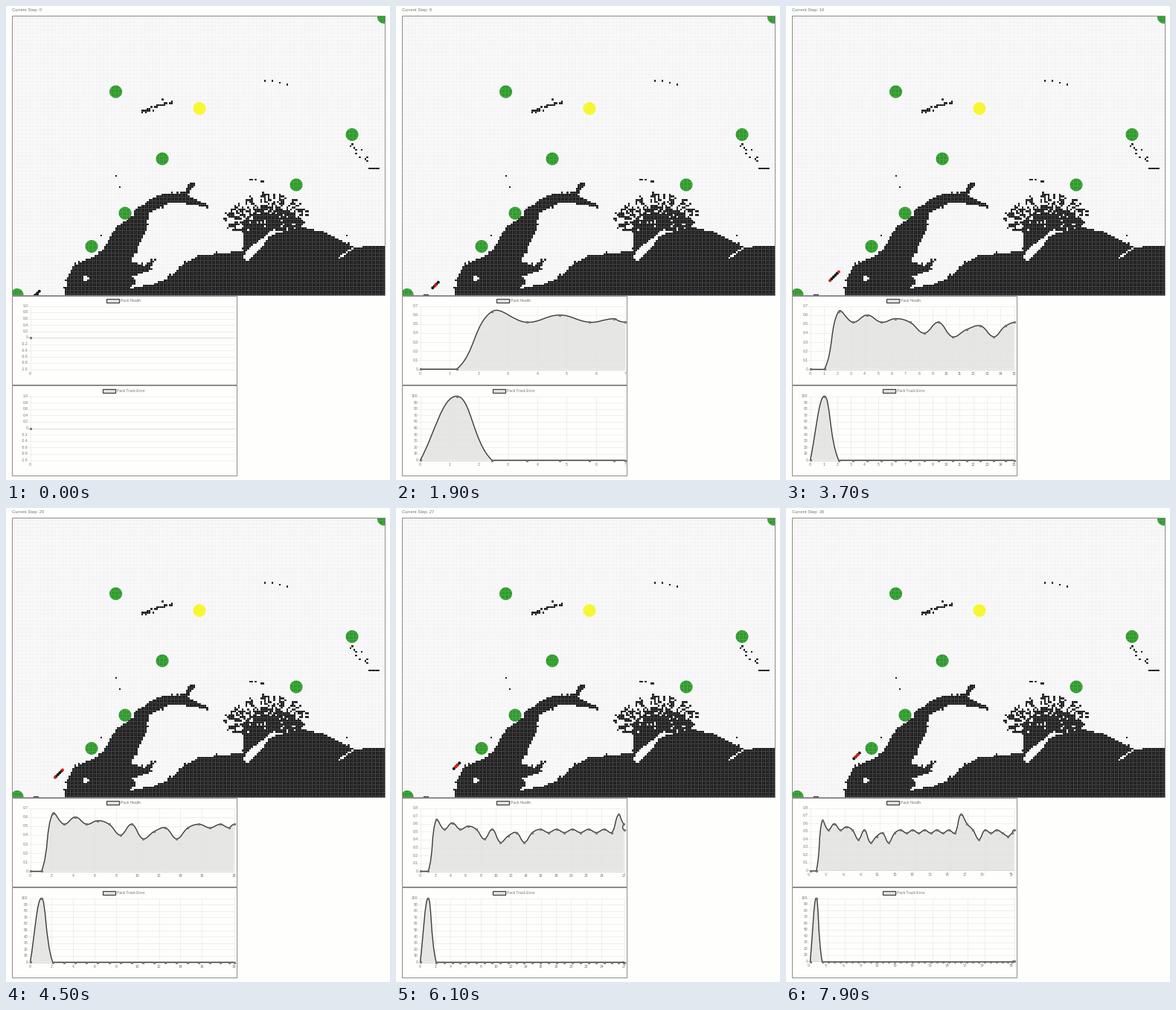
Recreate the animation shown at these times as a matplotlib script. Size 516 by 636 pixels, loop 8000 ms.

```python
import numpy as np
import matplotlib.pyplot as plt
from matplotlib.animation import FuncAnimation
from matplotlib.patches import Circle, PathPatch, Rectangle
from matplotlib.path import Path

W, H, FRAMES, DT = 516, 636, 80, 100
PT = 0.72  # points per pixel at 100 dpi
PAGE, GRID, ZERO, INK, TEXT, FILL = (
    "#fefefc", "#ececec", "#cfcfcf", "#3c3c3c", "#777777", "#e2e2e2")

plt.rcParams["font.family"] = "Liberation Sans"
fig = plt.figure(figsize=(W / 100, H / 100), dpi=100, facecolor=PAGE)
ax = fig.add_axes([0, 0, 1, 1])
ax.axis("off")
ax.set_autoscale_on(False)

# ---------------------------------------------------------------- map
X0, Y0, CELL, COLS, ROWS = 9, 14, 2.5, 200, 150

COAST = [
    (78, 390), (83, 362), (92, 347), (126, 332), (136, 318), (148, 296), (171, 281),
    (173, 273), (205, 253), (240, 250), (247, 237), (257, 235), (243, 254), (276, 270),
    (240, 265), (220, 263), (192, 277), (188, 300), (167, 342), (186, 348), (201, 339),
    (191, 356), (169, 362), (173, 370), (166, 379), (212, 370), (230, 354), (240, 345),
    (258, 335), (312, 329), (322, 331), (317, 340), (327, 341), (358, 306), (396, 296),
    (430, 304), (468, 323), (510, 322), (510, 390)]
DELTA = [(320, 331), (318, 306), (316, 290), (345, 267), (386, 276),
         (402, 292), (380, 300), (356, 302), (340, 314), (326, 326)]
# start, end, number of cells, scatter
ISLANDS = [((181, 142), (222, 127), 30, 1.6), ((463, 186), (485, 206), 11, 2.5),
           ((488, 218), (500, 218), 6, 0), ((327, 233), (347, 235), 5, 1),
           ((347, 100), (378, 104), 4, 0), ((148, 228), (153, 242), 2, 0),
           ((128, 308), (458, 307), 2, 0), ((37, 387), (42, 387), 3, 0)]
GREEN = [(147.5, 115), (210, 205), (390, 240), (160, 278), (115, 322.5),
         (465, 172.5), (15, 387.5), (507.5, 15)]
YELLOW = [(260, 137.5)]


def land_cells():
    rng = np.random.default_rng(5)
    cx, cy = np.meshgrid(X0 + CELL * (np.arange(COLS) + 0.5),
                         Y0 + CELL * (np.arange(ROWS) + 0.5))
    centres = np.c_[cx.ravel(), cy.ravel()]
    land = np.zeros((ROWS, COLS), bool)

    def mark(x, y, value=True):
        r = ((np.asarray(y) - Y0) / CELL).astype(int).clip(0, ROWS - 1)
        c = ((np.asarray(x) - X0) / CELL).astype(int).clip(0, COLS - 1)
        land[r, c] = value

    for shape in (COAST, DELTA):
        land |= Path(shape).contains_points(centres).reshape(land.shape)
    delta = (cx > 300) & (cx < 400) & (cy < 302)
    land &= ~(delta & (rng.random(land.shape) < 0.14))

    # thin channels of land fanning out of the delta
    for angle in np.linspace(0.85, 1.95, 24) * np.pi:
        walk = np.arange(10) * 2.2
        drift = rng.normal(0, 1, 10).cumsum()
        mark(350 + (34 + walk) * np.cos(angle) + drift,
             286 + (14 + walk) * np.sin(angle) + drift[::-1])

    # ragged shore
    p = np.pad(land, 1, mode="edge")
    near = p[:-2, 1:-1] | p[2:, 1:-1] | p[1:-1, :-2] | p[1:-1, 2:]
    spiky = (cx > 200) & (cx < 315) & (cy > 315)
    land |= near & (rng.random(land.shape) < np.where(spiky, 0.3, 0.1))

    for a, b, count, scatter in ISLANDS:
        pts = np.linspace(a, b, count) + rng.normal(0, 1, (count, 2)) * scatter
        mark(*pts.T)
    mark(np.linspace(447, 464, 14), np.linspace(338, 326, 14), False)
    land[np.hypot(cx - 107, cy - 365) < 3.5] = False
    return land


def map_image():
    px, py = np.arange(500), np.arange(375)
    land = land_cells()[(py // CELL).astype(int)][:, (px // CELL).astype(int)]
    img = np.ones((375, 500, 3))
    img[land] = 0.03
    gx, gy = np.meshgrid(px + X0 + 0.5, py + Y0 + 0.5)
    for spots, colour in ((GREEN, (0.08, 0.58, 0.06)), (YELLOW, (1, 1, 0.05))):
        for x, y in spots:
            cover = np.clip(9 - np.hypot(gx - x, gy - y), 0, 1)[..., None]
            img += cover * (np.array(colour) - img)
    line = np.array([0.15, 0, 0.32, 0, 0.15])
    alpha = np.maximum(line[px % 5][None], line[py % 5][:, None])[..., None]
    return img + alpha * (np.array([0.84, 0.84, 0.86]) - img)


ax.imshow(map_image(), extent=(X0, X0 + 500, Y0 + 375, Y0),
          interpolation="nearest", aspect="auto", zorder=1)
ax.set(xlim=(0, W), ylim=(H, 0))


def border(x0, y0, x1, y1):
    ax.add_patch(Rectangle((x0, y0), x1 - x0, y1 - y0, fc="none", ec="#8c8c8c",
                           lw=PT, snap=False, zorder=8))


def label(x, y, s, size=5, **kw):
    return ax.text(x, y, s, fontsize=size * PT, color=TEXT,
                   **{"va": "center", "zorder": 7, **kw})


border(8.5, 13.5, 509.5, 388.5)
border(8.5, 389.5, 310.5, 508.5)
border(8.5, 509.5, 310.5, 630.5)

# ---------------------------------------------------------------- clock
KEY_TIME, KEY_STEP = [143, 1010, 2690, 7890], [0, 4, 12, 36]
STEPS = np.arange(36)
CHART_TIME = np.interp(STEPS, KEY_STEP, KEY_TIME) + 145


def step_at(t):
    return int(np.interp(t, KEY_TIME, KEY_STEP) + 1e-6)


# ---------------------------------------------------------------- charts
LEFT, TENSION = 32.5, 0.4
PULSES = {8: -.08, 10: -.12, 11: -.08, 13: -.16, 25: .2, 26: .12, 28: -.08, 33: -.08}


def health():
    """A ripple that starts strong and settles, with a few dips and one surge."""
    v = np.where(STEPS % 2, 0.52, 0.48 + 0.02 * np.where(STEPS < 8, 10 - STEPS, 0))
    for step, amount in PULSES.items():
        v[step] += amount
    v[:2] = 0
    return v


def value_scale(v):
    top = v.max()
    if top == 0:
        return -1, 1, 0.2
    if top <= 1:
        return 0, np.ceil(top * 10) / 10, 0.1
    return 0, 100, 10


class Chart:
    def __init__(self, values, top, bottom, title, key_x):
        self.values, self.top, self.bottom = values, top, bottom
        y = top - 7
        ax.add_patch(Rectangle((key_x, y - 3), 17.5, 5.5, fc=FILL, ec=INK,
                               lw=1.2 * PT, zorder=6))
        label(key_x + 19.5, y, title)
        self.states = self.replay()

    def area(self, n):
        right = 308 if n < 10 else 306.5
        return right, self.bottom - (1.5 if n >= 35 else 0)

    def to_y(self, v, n):
        lo, hi, _ = value_scale(self.values[:n + 1])
        bottom = self.area(n)[1]
        return bottom - (v - lo) / (hi - lo) * (bottom - self.top)

    def model(self, n):
        """Rows of point, incoming handle, outgoing handle."""
        right, bottom = self.area(n)
        p = np.c_[np.linspace(LEFT, right, n + 1), self.to_y(self.values[:n + 1], n)]
        prev, nxt = np.vstack([p[:1], p[:-1]]), np.vstack([p[1:], p[-1:]])
        d0 = np.hypot(*(p - prev).T)
        d1 = np.hypot(*(nxt - p).T)
        total = np.maximum(d0 + d1, 1e-9)
        a = p - (TENSION * d0 / total)[:, None] * (nxt - prev)
        b = p + (TENSION * d1 / total)[:, None] * (nxt - prev)
        for h in (a, b):
            h[:, 0] = h[:, 0].clip(LEFT, right)
            h[:, 1] = h[:, 1].clip(self.top, bottom)
        return np.hstack([p, a, b])

    def replay(self):
        """Each update restarts a one-second ease-out from the current pose."""
        n, t0 = 0, -1000
        start = goal = self.model(0)
        states = []

        def pose(t):
            k = 1 - (1 - min((t - t0) / 1000, 1)) ** 4
            return start + k * (goal - start)

        for t in range(0, FRAMES * DT, DT):
            while n < 35 and CHART_TIME[n + 1] <= t:
                n += 1
                view = pose(CHART_TIME[n])
                t0, goal = CHART_TIME[n], self.model(n)
                start = np.vstack([view, goal[n:]])
            states.append((n, pose(t)))
        return states

    def draw(self, i):
        n, s = self.states[i]
        right, bottom = self.area(n)
        out = []

        lo, hi, gap = value_scale(self.values[:n + 1])
        ticks = lo + gap * np.arange(round((hi - lo) / gap) + 1)
        ys = self.to_y(ticks, n)
        tones = [ZERO if abs(v) < 1e-9 else GRID for v in ticks]
        out.append(ax.hlines(ys, LEFT - 4, right, color=tones, lw=0.8 * PT, zorder=2))
        for v, y in zip(ticks, ys):
            text = "0" if abs(v) < 1e-9 else f"{v:.0f}" if gap > 1 else f"{v:.1f}"
            out.append(label(LEFT - 3, y, text, ha="right"))

        count = n + 1
        skip = 1 + int(count * 16 / 275)
        shown = [j for j in range(count)
                 if j == n or (j % skip == 0 and (skip == 1 or j + skip < count))]
        xs = [LEFT + (right - LEFT) * j / max(n, 1) for j in shown]
        out.append(ax.vlines(xs, self.top, bottom + 4, color=GRID, lw=0.8 * PT, zorder=2))
        tilt = dict(rotation=16, ha="right") if n >= 35 else dict(ha="center")
        for j, x in zip(shown, xs):
            out.append(label(x, bottom + 6, str(j), **tilt))

        p, a, b = s[:, :2], s[:, 2:4], s[:, 4:]
        if n:
            verts, codes = [p[0]], [Path.MOVETO]
            for j in range(n):
                verts += [b[j], a[j + 1], p[j + 1]]
                codes += [Path.CURVE4] * 3
            base = self.to_y(0, n)
            closed = Path(verts + [(p[-1, 0], base), (p[0, 0], base)],
                          codes + [Path.LINETO] * 2)
            out.append(ax.add_patch(PathPatch(closed, fc=FILL, ec="none", alpha=0.85,
                                              zorder=3)))
            out.append(ax.add_patch(PathPatch(Path(verts, codes), fc="none", ec=INK,
                                              lw=1.4 * PT, zorder=4)))
        out += ax.plot(*p.T, "o", ms=2.6 * PT, mfc="#909090", mec="#505050",
                       mew=0.6 * PT, zorder=5)
        return out


charts = [Chart(health(), 402.5, 487.5, "Pack Health", 134.5),
          Chart(np.where(STEPS == 1, 100.0, 0.0), 523.5, 609.5, "Pack Track Error", 129.5)]

# ---------------------------------------------------------------- pack
clip_box = Rectangle((X0, Y0), 500, 375, transform=ax.transData)


def draw_pack(step):
    """The pack climbs a diagonal while its two red members sweep back and forth."""
    mid = 41 + 1.5 * step
    spots = [(mid + d, "#141414") for d in np.arange(-1.5, 1.6) * CELL]
    if step:
        lead = 2 + 4 * np.cos(2 * np.pi * (step - 17) / 26)
        spots += [(mid - lead, "#c81e10"), (mid + lead, "#f01808")]
    out = []
    for u, colour in spots:
        dot = ax.add_patch(Circle((u, 427.5 - u), 2, fc=colour, ec="none", zorder=6))
        dot.set_clip_path(clip_box)
        out.append(dot)
    return out


counter = label(8, 5.5, "", 5.9)
live = []


def update(i):
    while live:
        live.pop().remove()
    step = step_at(i * DT)
    counter.set_text(f"Current Step: {step}")
    live.extend(draw_pack(step))
    for chart in charts:
        live.extend(chart.draw(i))
    return [counter, *live]


anim = FuncAnimation(fig, update, frames=FRAMES, interval=DT, repeat=True,
                     repeat_delay=0, blit=False, init_func=lambda: [])
plt.show()
```
